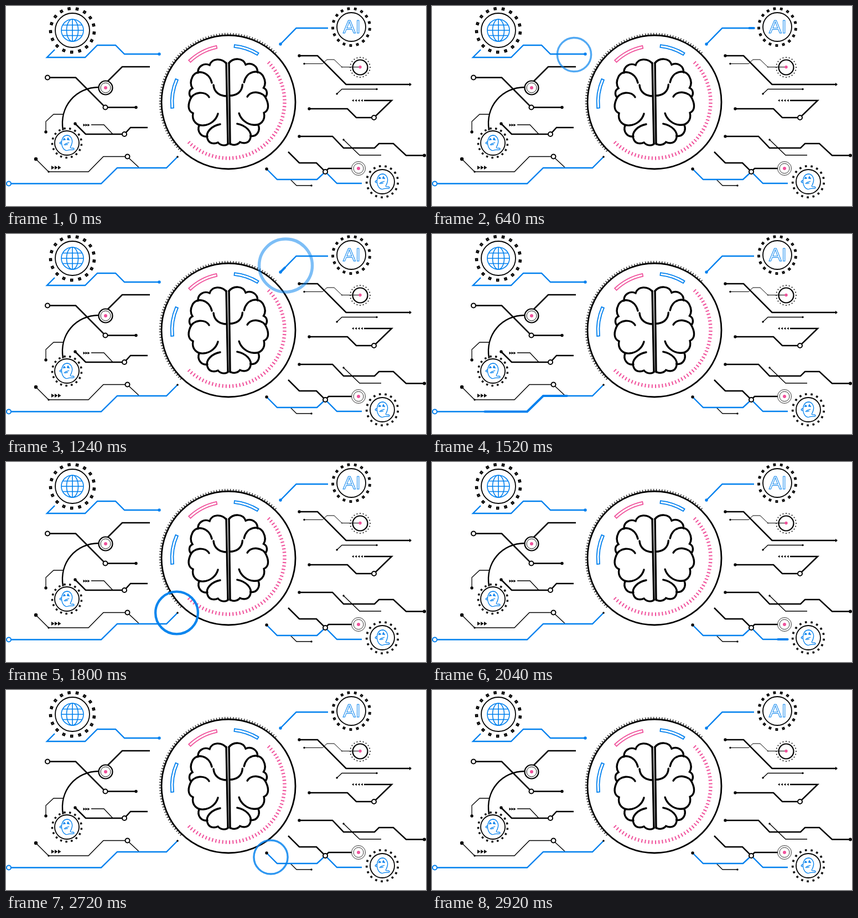
Recreate the animation shown at these times as an HTML page. Size 759 by 362 pixels, loop 3080 ms.

```html
<!DOCTYPE html>
<html lang="en">
<head>
<meta charset="utf-8">
<style>
html, body { margin: 0; width: 100%; height: 100%; overflow: hidden; background: #fff; }
svg { display: block; }
</style>
</head>
<body>
<svg id="stage" width="759" height="362" viewBox="0 0 759 362" fill="none" stroke-linejoin="miter"></svg>
<script>
const BLUE = '#0080ee', PINK = '#f0529c', BLACK = '#000';
const LOOP = 3080, STEP = 40;
const stage = document.getElementById('stage');

const line = (d, w = 2.5, color = BLACK, extra = '') =>
  `<path d="${d}" stroke="${color}" stroke-width="${w}" ${extra}/>`;
const dot = (x, y, r = 2.7, color = BLACK) => `<circle cx="${x}" cy="${y}" r="${r}" fill="${color}"/>`;
const ring = (x, y, r = 4, w = 2, color = BLACK, fill = '#fff') =>
  `<circle cx="${x}" cy="${y}" r="${r}" fill="${fill}" stroke="${color}" stroke-width="${w}"/>`;
const polar = (r, deg) => {
  const a = deg * Math.PI / 180;
  return `${(402 + r * Math.cos(a)).toFixed(2)},${(174 + r * Math.sin(a)).toFixed(2)}`;
};
const arc = (r, a, b) => `M${polar(r, a)}A${r},${r} 0 0 1 ${polar(r, b)}`;
const band = (a, b, color) =>
  line(`${arc(99.6, a, b)}L${polar(104.4, b)}A104.4,104.4 0 0 0 ${polar(104.4, a)}Z`, 1.8, color);

function gear(x, y, r, inner, size) {
  let s = ring(x, y, inner, 1.8);
  for (let i = 0; i < 17; i++) {
    s += `<rect x="${-size / 2}" y="${-size / 2}" width="${size}" height="${size}" stroke="#000"
      stroke-width="${size * .72}" transform="translate(${x} ${y}) rotate(${i * 360 / 17 - 8.7}) translate(0 ${-r})"/>`;
  }
  return s;
}

// Row of solid triangles; a negative width points left
function arrows(x, y, count, pitch, w, h) {
  let d = '';
  for (let i = 0; i < count; i++) d += `M${x + i * pitch},${y - h / 2}l${w},${h / 2}l${-w},${h / 2}z`;
  return `<path d="${d}" fill="#000"/>`;
}

const globe = `<g stroke="${BLUE}" stroke-width="1.6">
  <circle cx="120" cy="44" r="20"/><ellipse cx="120" cy="44" rx="10.5" ry="20"/>
  <path d="M120,24V64M100,44H140M103,34.5H137M103,53.5H137"/></g>`;

const face = (x, y) => `<g transform="translate(${x} ${y})" stroke="${BLUE}" stroke-width="1.3" stroke-linejoin="round">
  <path d="M-8,7C-11,0 -10,-13 0,-14C8,-14 11,-5 9,1C8,6 5,8 7,9C9,10 13,8 13,11C12,14 5,11 2,13C-1,15 -6,12 -8,7Z"/>
  <path d="M-9,-2C-14,-2 -14,3 -9,1M-5,4C-3,0 1,1 4,-1M-3,4Q0,2 2,3"/>
  <path d="M-7,-5L-5,-9L-2,-6ZM0,-6L2,-10L5,-5Z" fill="${BLUE}" stroke-width=".6"/></g>`;

const halfBrain = `
  M398,104C390,94 372,94 368,107C357,102 346,110 347,121
  M372,139C367,118 344,114 337,128C333,136 333,143 337,149C329,153 331,162 334,165
  M367,165C360,153 338,155 333,169C327,183 331,191 338,194C335,209 346,217 357,216C370,215 380,206 383,195
  M349,216C345,226 352,238 364,236
  M387,214C371,217 360,229 364,240C367,250 377,250 383,247C389,254 399,253 401,249
  M375,143C376,156 386,163 399,163`;
// The right half is mirrored about the slightly tilted middle line
const brain = `<g stroke="#000" stroke-width="3.4" stroke-linecap="round">
  <path d="${halfBrain}"/><path d="${halfBrain}" transform="matrix(-1 0 .0345 1 797.4 -.8)"/>
  <path d="M398,103L401,250M403,103L405,250"/></g>`;

const routes = [
  'M88,79L74,93H143L165,71H198L214,87H277',
  'M582,40H524.5L496,69',
  'M9,321.5H172L201,293H290L310,273',
  'M643,321H598L577,300L562,314H490L471,295'
];

const left =
  gear(120, 44, 39.5, 31, 3.2) + globe + dot(277, 87, 2.7, BLUE) +
  line('M75,129.5H126L179.5,183.5H235') + ring(75, 129.5) + ring(179.5, 183.5) + dot(235, 183.5) +
  line('M260,110H210L183,137') + line('M168,147C126,147 96,182 103,225') +
  ring(180, 148, 12.5, 2.2) + ring(180, 148, 9, .9) + dot(180, 148, 3, PINK) +
  line('M103,196H86L72,209V228', 1.3) + dot(72, 228) +
  line('M125,213L144,232H214L225,220H256') + dot(125, 213) + ring(214, 232) +
  line('M154,215H177L193,232', 1.3) + arrows(139.5, 215.5, 3, 4, 4, 5) +
  gear(110, 248, 26.5, 22, 2) + face(110, 248) +
  line('M54,277L77,300H149L176,272.5H219L240,292', 1.4) + dot(54, 277, 3.2) + dot(77, 300, 1.7) +
  ring(219.5, 272.5) + arrows(82, 292.5, 3, 6, 5.5, 7) +
  ring(5, 321.5, 4, 2, BLUE);

const center =
  ring(402, 174, 121, 2.8) + line(arc(123, 134, 313.9), 4.5, BLACK, 'stroke-dasharray="1.2 3.8"') +
  line(arc(102, -45, 134.9), 6.5, PINK, 'pathLength="308" stroke-dasharray="2 4"') +
  band(-133.5, -102, PINK) + band(-84, -58.5, BLUE) + band(174, 203.8, BLUE) + brain;

let beads = '';
for (let i = 0; i < 20; i++) {
  const a = i * Math.PI / 10;
  beads += dot(640 + 18 * Math.cos(a), 111 + 18 * Math.sin(a), 1);
}
const right =
  dot(496, 69, 2.7, BLUE) + gear(624, 38, 33.5, 26, 2.8) +
  `<text x="625" y="49" text-anchor="middle" font-family="'Liberation Sans', Arial, sans-serif" font-size="34"
    stroke="${BLUE}" stroke-width="1">AI</text>` +
  line('M530,90H563L614.5,142H730') + dot(530, 90) + arrows(729, 142, 1, 0, 4, 6.5) +
  beads + ring(640, 111, 13.5, 2.2) + line('M539,104.5H572L580,97H593L607,110.5H640', 1) +
  dot(539, 104.5, 1.7) + dot(607, 110.5, 1) + dot(640, 110.5, 2.7, PINK) +
  line('M598,159L607,150.5H670', 1.3) + dot(598, 159, 1.7) + dot(670, 150.5, 1.7) +
  arrows(628.5, 171, 4, 5.4, -3.5, 4.5) + line('M647,171H697L665,202H633L617,186H548') +
  ring(665, 202) + dot(548, 186) +
  line('M530,236H590L610,257H666L674,249H700L723,270.5H756') + dot(530, 236) + dot(756, 270.5, 2.9) +
  line('M610,242L639,270H678', 1.4) + dot(610, 242, 1.7) +
  line('M510,264L530,284H561L577,300L583,294H625') +
  ring(637, 294, 12.5, .8) + ring(637, 294, 9, .8) + dot(637, 294, 3, PINK) +
  line('M514,314L525,325H552', 1.3) + dot(552, 325, 1.7) +
  gear(680, 318, 28.3, 22, 2.1) + face(680, 318);

stage.innerHTML = center + left + right +
  routes.map(d => line(d, 2.4, BLUE)).join('') + ring(577, 300) + dot(471, 295) + dot(310, 273, 1.8) +
  routes.map(d => line(d, 4, BLUE, 'class="pulse" pathLength="1" stroke-linecap="round"')).join('') +
  routes.map(() => `<circle class="wave" stroke="${BLUE}"/>`).join('');

const pulses = [...document.querySelectorAll('.pulse')];
const waves = [...document.querySelectorAll('.wave')];
// start time, duration
const pulseSpec = [[0, 600], [610, 670], [1240, 540], [2010, 640]];
// x, y, start time, strength
const waveSpec = [[257, 88, 480, .68], [505.5, 57, 960, .85], [308.5, 273, 1600, .95], [478.5, 302.5, 2560, .82]];

// Piecewise linear curve through [time, value] points
function curve(points, t) {
  let [t0, v0] = points[0];
  if (t <= t0) return v0;
  for (const [t1, v1] of points) {
    if (t < t1) return v0 + (v1 - v0) * (t - t0) / (t1 - t0);
    [t0, v0] = [t1, v1];
  }
  return v0;
}
const radiusCurve = [[0, 0], [80, 15], [160, 30.6], [200, 38.4], [240, 44], [280, 48], [320, 53.5]];
const alphaCurve = [[0, 1], [200, 1], [280, .6], [320, .25]];

function draw(now) {
  const t = Math.floor(now % LOOP / STEP) * STEP;
  pulses.forEach((p, i) => {
    const [start, duration] = pulseSpec[i], k = (t - start) / duration;
    p.style.display = k > 0 && k < 1 ? '' : 'none';
    const tail = k * k, head = 1 - (1 - k) ** 2;
    p.setAttribute('stroke-dasharray', `${Math.max(0, head - tail)} 2`);
    p.setAttribute('stroke-dashoffset', -tail);
  });
  waves.forEach((w, i) => {
    const [x, y, start, strength] = waveSpec[i], age = t - start, r = curve(radiusCurve, age);
    w.style.display = age > 0 && age < 360 ? '' : 'none';
    w.setAttribute('cx', x);
    w.setAttribute('cy', y);
    w.setAttribute('r', r);
    w.setAttribute('stroke-width', r * .113);
    w.setAttribute('stroke-opacity', strength * curve(alphaCurve, age));
  });
}

const begin = performance.now();
function tick() {
  draw(performance.now() - begin);
  requestAnimationFrame(tick);
}
tick();
</script>
</body>
</html>
```
